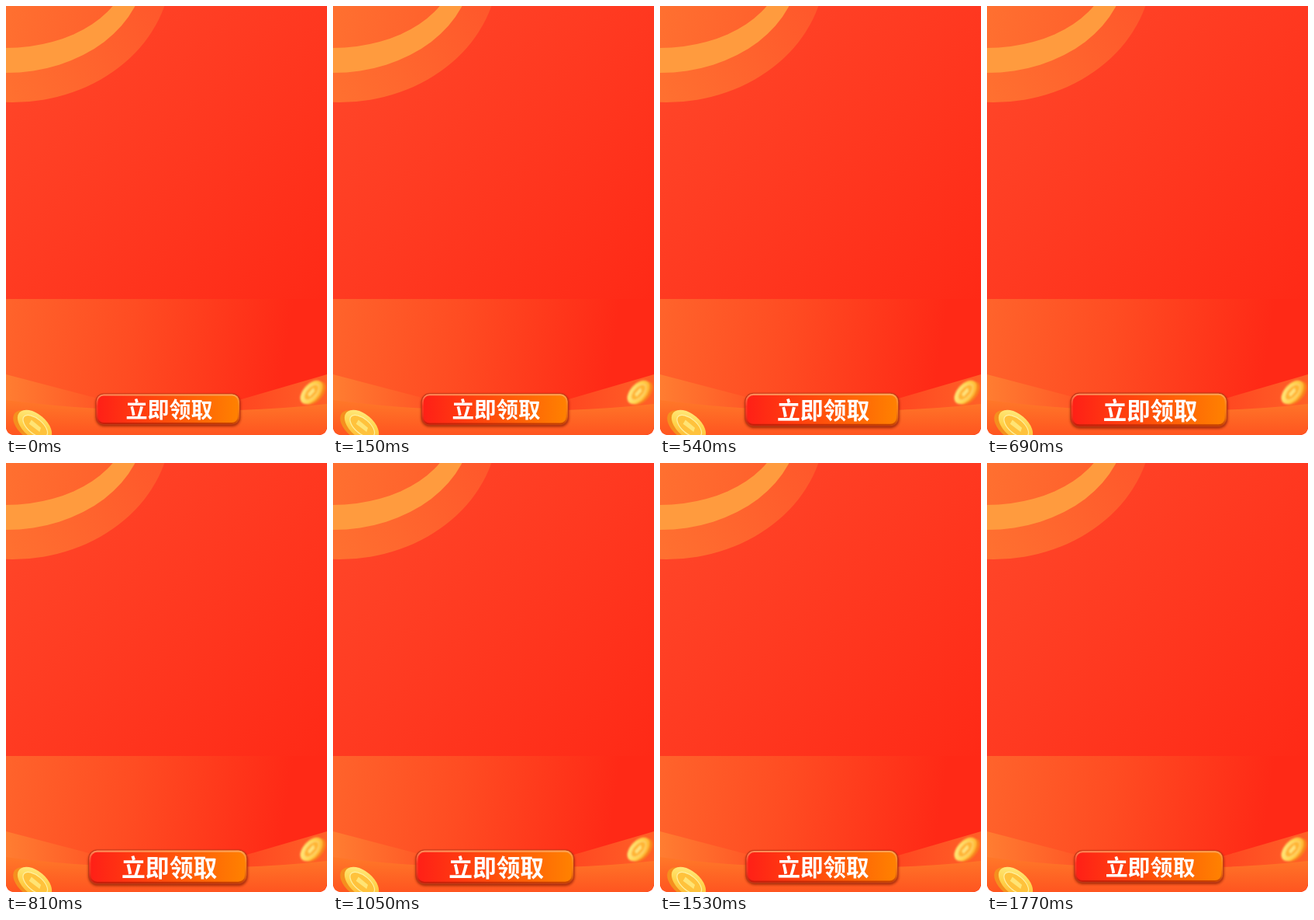
Write an HTML page that moves like this. It is 414 by 552 pixels and loops after 1800 ms.

```html
<!DOCTYPE html>
<html lang="zh-CN">
<head>
<meta charset="utf-8">
<style>
html, body { margin: 0; width: 100%; height: 100%; overflow: hidden; background: #fff; }
svg { display: block; width: 414px; height: 552px; }
text { font: 700 28px "Noto Sans CJK SC", "Noto Sans CJK", sans-serif; fill: #fff; text-anchor: middle; }
</style>
</head>
<body>
<svg viewBox="0 0 414 552">
  <defs>
    <linearGradient id="base" gradientUnits="userSpaceOnUse" x1="40" y1="60" x2="400" y2="400">
      <stop offset="0" stop-color="#ff4528"/><stop offset="1" stop-color="#ff2916"/>
    </linearGradient>
    <linearGradient id="floor" gradientUnits="userSpaceOnUse" x1="0" y1="400" x2="360" y2="455">
      <stop offset="0" stop-color="#ff632b"/><stop offset=".45" stop-color="#ff4c22"/>
      <stop offset="1" stop-color="#ff2916"/>
    </linearGradient>
    <linearGradient id="disc" gradientUnits="userSpaceOnUse" x1="0" y1="110" x2="200" y2="10">
      <stop offset="0" stop-color="#ff7030"/><stop offset="1" stop-color="#ff582b"/>
    </linearGradient>
    <linearGradient id="core" gradientUnits="userSpaceOnUse" x1="0" y1="0" x2="140" y2="30">
      <stop offset="0" stop-color="#ff7030"/><stop offset="1" stop-color="#ff602c"/>
    </linearGradient>
    <linearGradient id="rayL">
      <stop offset="0" stop-color="#ff7d31"/><stop offset="1" stop-color="#ff5425"/>
    </linearGradient>
    <linearGradient id="rayR">
      <stop offset="0" stop-color="#ff4420"/><stop offset="1" stop-color="#ff6027"/>
    </linearGradient>
    <linearGradient id="ground" x1="0" y1="0" x2="0" y2="1">
      <stop offset="0" stop-color="#ff7829"/><stop offset="1" stop-color="#ff5520"/>
    </linearGradient>
    <linearGradient id="gold" x1="0" y1="0" x2="1" y2="1">
      <stop offset="0" stop-color="#fff08a"/><stop offset=".5" stop-color="#ffd34c"/>
      <stop offset="1" stop-color="#ffad2c"/>
    </linearGradient>
    <linearGradient id="face">
      <stop offset="0" stop-color="#ff1f17"/><stop offset=".45" stop-color="#ff4a0c"/>
      <stop offset="1" stop-color="#ff8200"/>
    </linearGradient>
    <linearGradient id="rim" x1="0" y1="0" x2="0" y2="1">
      <stop offset="0" stop-color="#ffb070" stop-opacity=".75"/>
      <stop offset=".4" stop-color="#ff9050" stop-opacity=".2"/>
      <stop offset="1" stop-color="#a01800" stop-opacity=".6"/>
    </linearGradient>
    <filter id="soft" x="-20%" y="-50%" width="140%" height="200%"><feGaussianBlur stdDeviation="1.6"/></filter>
    <filter id="haze" x="-20%" y="-20%" width="140%" height="140%"><feGaussianBlur stdDeviation=".9"/></filter>
    <clipPath id="card"><path d="M0 0H414V540Q414 552 402 552H12Q0 552 0 540Z"/></clipPath>
  </defs>

  <g clip-path="url(#card)">
    <rect width="414" height="552" fill="url(#base)"/>
    <ellipse cx="8" cy="-50" rx="205" ry="174" fill="url(#disc)"/>
    <ellipse cx="0" cy="-50" rx="179" ry="136" fill="#ff9b3e"/>
    <ellipse cx="0" cy="-50" rx="157" ry="104" fill="url(#core)"/>
    <rect y="377" width="414" height="175" fill="url(#floor)"/>
    <path d="M0 474L130 508V530H0Z" fill="url(#rayL)"/>
    <path d="M414 474L290 510V530H414Z" fill="url(#rayR)"/>
    <path d="M0 507Q60 515 120 518Q207 524 300 520Q360 518 414 512V552H0Z" fill="url(#ground)"/>

    <g transform="translate(37 540) rotate(40)">
      <ellipse cx="-4" cy="4" rx="26" ry="15" fill="#f58f1e"/>
      <ellipse rx="26" ry="15" fill="url(#gold)"/>
      <ellipse cx="1" rx="19" ry="9.5" fill="#ffc23c" stroke="#fff0a0" stroke-width="1.2"/>
      <path d="M-8 -3L8 -3L10 2L-7 3Z" fill="#ffe474"/>
    </g>
    <g transform="translate(394 497) rotate(-48)" filter="url(#haze)">
      <ellipse cx="2" cy="4" rx="18" ry="10" fill="#f9851f"/>
      <ellipse rx="18" ry="10.5" fill="url(#gold)"/>
      <ellipse rx="12.5" ry="6.5" fill="#ffb536" stroke="#ffe58a"/>
      <path d="M-5 -2H6L4 2H-6Z" fill="#ffe27a"/>
    </g>

    <g id="button">
      <rect x="115.5" y="500" width="187" height="41" rx="11" fill="#861800" opacity=".7" filter="url(#soft)"/>
      <rect x="115.5" y="498.5" width="186.5" height="40.5" rx="10.5" fill="#bd3a18"/>
      <rect x="116.5" y="499.5" width="184.5" height="38.5" rx="9.5" fill="url(#face)"/>
      <rect x="117.5" y="500.5" width="182.5" height="36.5" rx="8.5" fill="none" stroke="url(#rim)" stroke-width="2"/>
      <text x="210.5" y="530">立即领取</text>
    </g>
  </g>
</svg>
<script>
const LOOP = 1800, STEP = 30, PEAK = 900;
const button = document.getElementById("button");
const start = performance.now();

// Grow to the midpoint, ease back part way, then snap to rest.
function scaleAt(t) {
  return t <= PEAK ? 1 + 0.111 * t / PEAK
                   : 1.111 - 0.08 * (t - PEAK) / (LOOP - PEAK);
}

function draw(now) {
  const time = Math.max(0, now - start) % LOOP;
  const s = scaleAt(Math.floor(time / STEP) * STEP);
  button.setAttribute("transform", `translate(209 509) scale(${s}) translate(-209 -509)`);
  requestAnimationFrame(draw);
}
draw(start);
</script>
</body>
</html>
```
